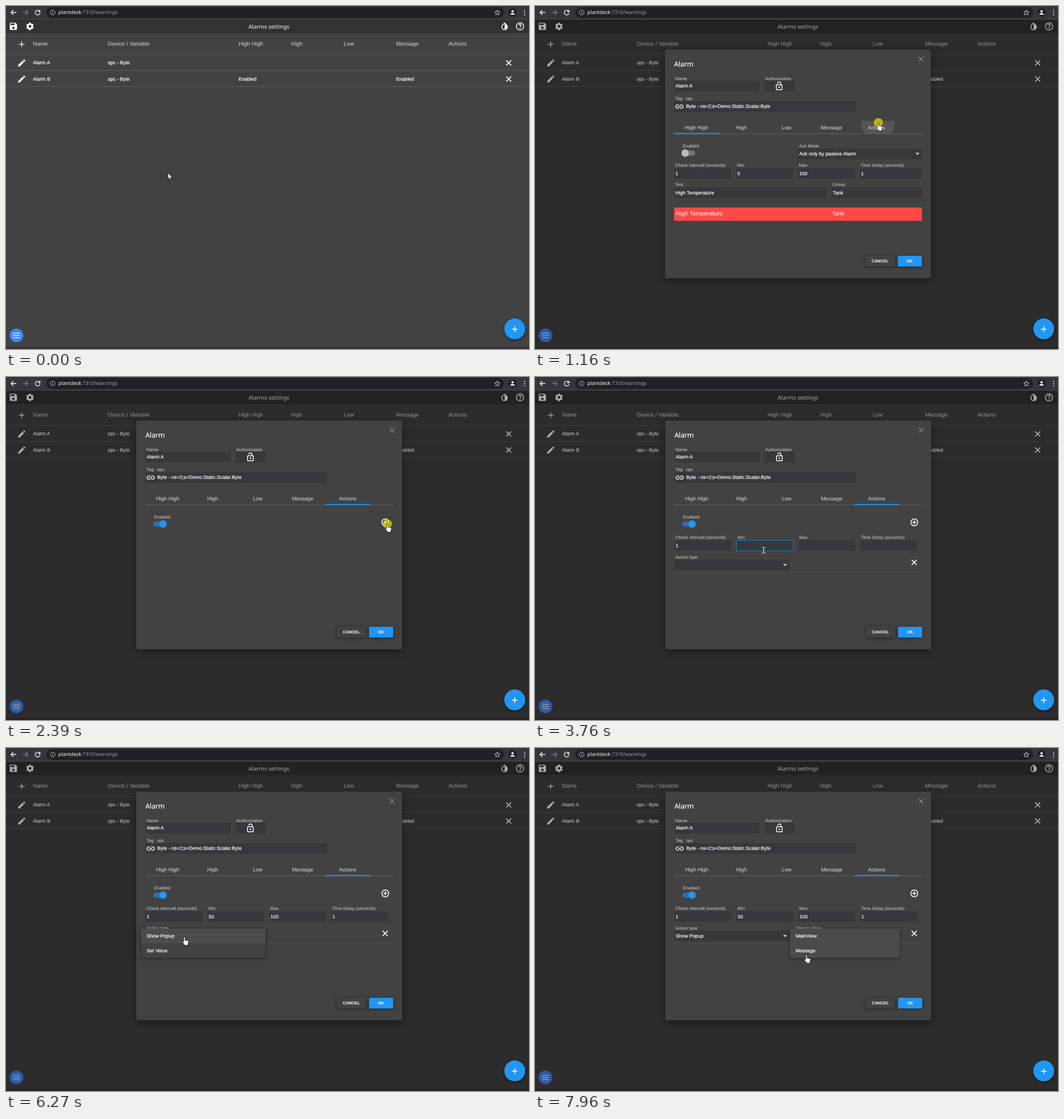
These frames come from a looping animation (923 by 606 pixels, 8 s). An HTML page:

```html
<!DOCTYPE html>
<html lang="en">
<head>
<meta charset="utf-8">
<title>Alarms settings</title>
<style>
html, body { margin: 0; width: 100%; height: 100%; overflow: hidden; background: #424242; }
svg { display: block; }
text {
  font-family: "Liberation Sans", Arial, sans-serif; font-size: 8.65px; fill: #fff;
  dominant-baseline: central; text-rendering: geometricPrecision; white-space: pre;
}
.ui { font-family: "Noto Sans", "Open Sans", sans-serif; }
.head text { font-size: 9.9px; fill: #d6d6d6; }
.val { stroke: #fff; stroke-width: .2px; }
.lab { font-size: 7.93px; fill: #cfcfcf; }
.tab text { font-size: 9.3px; fill: #dcdcdc; text-anchor: middle; }
.btn { font-size: 7.25px; font-weight: bold; text-anchor: middle; }
.box { fill: #37373c; }
.focus { stroke: #1b80c4; }
.icon { fill: #fff; fill-rule: evenodd; }
.line { fill: none; stroke: #fff; }
.dialog { filter: drop-shadow(0 5px 8px rgba(0, 0, 0, .4)); }
.menu { filter: drop-shadow(0 1.5px 2.5px rgba(0, 0, 0, .5)); }
</style>
</head>
<body>
<svg width="923" height="606" viewBox="0 0 923 606">
  <defs>
    <path id="pencil" class="icon" d="M3 17.25V21h3.75L17.81 9.94l-3.75-3.75zM20.71 7.04a1 1 0 0 0 0-1.41l-2.34-2.34a1 1 0 0 0-1.41 0l-1.83 1.83 3.75 3.75z" transform="scale(.7) translate(-12 -12)"/>
    <path id="cross" class="line" stroke-width="1.7" d="M-4.4-4.4 4.4 4.4M4.4-4.4-4.4 4.4"/>
    <path id="plus" class="line" d="M-5 0H5M0-5V5"/>
    <path id="drop" fill="#d8d8d8" d="M-3.6-1.8H3.6L0 1.8z"/>
    <clipPath id="paneClip"><rect x="244" y="228" width="440" height="206"/></clipPath>
    <clipPath id="tabClip"><rect x="563" y="203" width="80" height="23"/></clipPath>
  </defs>

  <g id="page">
    <rect width="923" height="606" fill="#424242"/>
    <rect y="602" width="923" height="4" fill="#3b3437"/>
    <rect y="24" width="923" height="24" fill="#323232"/>
    <path class="icon" transform="translate(4.5 27.3) scale(.71)" d="M17 3H5a2 2 0 0 0-2 2v14a2 2 0 0 0 2 2h14a2 2 0 0 0 2-2V7zM12 19a3 3 0 1 1 0-6 3 3 0 0 1 0 6zM15 9H5V5h10z"/>
    <g class="line" transform="translate(42.3 36)">
      <circle r="4" stroke-width="3.2"/>
      <circle r="5.8" stroke-width="1.9" pathLength="12" stroke-dasharray="1" stroke-dashoffset="-.5"/>
    </g>
    <path class="icon" transform="translate(871.4 27.3) scale(.71)" d="M17.66 7.93 12 2.27 6.34 7.93a8 8 0 1 0 11.32 0zM12 19.59a6 6 0 0 1-4.24-10.24L12 5.1z"/>
    <path class="icon" transform="translate(898.5 27.3) scale(.72)" d="M11 18h2v-2h-2zM12 2a10 10 0 1 0 0 20 10 10 0 0 0 0-20zm0 18a8 8 0 1 1 0-16 8 8 0 0 1 0 16zm0-14a4 4 0 0 0-4 4h2a2 2 0 1 1 4 0c0 2-3 1.75-3 5h2c0-2.25 3-2.5 3-5a4 4 0 0 0-4-4z"/>
    <text class="ui" x="464" y="36" font-size="9.9" style="font-size:9.9px" text-anchor="middle">Alarms settings</text>
    <use href="#plus" x="27.7" y="67.6" stroke-width="1.2"/>
    <g class="head">
      <text x="47.5" y="67.5">Name</text>
      <text x="179.5" y="67.5">Device / Variable</text>
      <text x="410.5" y="67.5">High High</text>
      <text x="503" y="67.5">High</text>
      <text x="596" y="67.5">Low</text>
      <text x="688.5" y="67.5">Message</text>
      <text x="781" y="67.5">Actions</text>
    </g>
    <path stroke="#5c5c5c" d="M0 85.5H923M0 113.9H923M0 142.4H923"/>
    <g class="val">
      <text x="47.5" y="100.3">Alarm A</text><text x="179.5" y="100.3">opc - Byte</text>
      <text x="47.5" y="128.6">Alarm B</text><text x="179.5" y="128.6">opc - Byte</text>
      <text x="410.5" y="128.6">Enabled</text><text x="688.5" y="128.6">Enabled</text>
    </g>
    <use href="#pencil" x="27.8" y="100.6"/><use href="#pencil" x="27.8" y="129"/>
    <use href="#cross" x="887.2" y="100.5"/><use href="#cross" x="887.2" y="128.9"/>
    <circle cx="18.5" cy="582" r="12" fill="#4486f8"/>
    <path class="line" stroke-width="1.3" d="M12.5 578.3h12M12.5 582.1h12M12.5 585.9h12"/>
  </g>

  <rect id="shade" y="24" width="923" height="582"/>

  <g id="browser">
    <rect width="923" height="24" fill="#35363a"/>
    <rect y="23" width="923" height="1" fill="#48494d"/>
    <rect x="71" y="2" width="808" height="19" rx="9.5" fill="#202124"/>
    <g class="line" stroke-width="1.3">
      <path d="M18 11.5H9M13 7.3 8.8 11.5 13 15.7"/>
      <path stroke="#7d7e81" d="M29.5 11.5H38.5M34.5 7.3 38.7 11.5 34.5 15.7"/>
      <path d="M59.3 9A4.2 4.2 0 1 0 60 12.6"/>
      <path fill="#fff" stroke="none" d="M60.6 6.5V10.9H56.2z"/>
      <circle cx="82.3" cy="11.5" r="4.2" stroke="#c4c6c9" stroke-width="1"/>
      <path stroke="#c4c6c9" stroke-width="1" d="M82.3 11V13.8M82.3 9V10"/>
      <path stroke="#d0d2d5" stroke-width="1" d="M867.2 6.9 868.5 10.1 871.9 10.4 869.3 12.6 870.1 15.9 867.2 14.1 864.3 15.9 865.1 12.6 862.5 10.4 865.9 10.1z"/>
    </g>
    <text class="ui" x="92.5" y="11.3" style="font-size:8.8px">plantdesk<tspan fill="#9aa0a6">:7310/warnings</tspan></text>
    <circle cx="894" cy="11.5" r="7.5" fill="#202124"/>
    <path fill="#fff" d="M890 15.2q0-2.6 4-2.6t4 2.6zM894 7.3a2.1 2.1 0 1 0 .01 0z"/>
    <path stroke="#fff" stroke-width="1.9" stroke-linecap="round" d="M915.3 7.7v.01M915.3 11.7v.01M915.3 15.7v.01"/>
  </g>

  <g style="filter:drop-shadow(0 2px 2.5px rgba(0,0,0,.4))">
    <circle cx="897.8" cy="570.4" r="18.4" fill="#2196f3"/>
  </g>
  <use href="#plus" x="897.8" y="571" stroke-width="1.5"/>

  <g id="dialog">
    <g class="dialog"><rect x="229.5" y="77" width="469" height="404" rx="3" fill="#424242"/></g>
    <text class="ui" x="245.5" y="102.8" style="font-size:12.2px" stroke="#fff" stroke-width=".2">Alarm</text>
    <path class="line" stroke="#c4c4c4" style="stroke:#b8b8b8" d="M676.7 89.7l8.6 8.6M685.3 89.7l-8.6 8.6"/>
    <text class="lab" x="247.3" y="128">Name</text>
    <rect class="box" x="245.5" y="132" width="150.5" height="19"/>
    <text class="val" x="247.8" y="141.2">Alarm A</text>
    <text class="lab" x="406" y="128">Authorization</text>
    <rect class="box" x="404.5" y="132" width="52.7" height="19"/>
    <path class="icon" transform="translate(422.2 132.8) scale(.72)" d="M12 17a2 2 0 1 0 0-4 2 2 0 0 0 0 4zm6-9h-1V6A5 5 0 0 0 7 6h1.9a3.1 3.1 0 0 1 6.2 0v2H6a2 2 0 0 0-2 2v10a2 2 0 0 0 2 2h12a2 2 0 0 0 2-2V10a2 2 0 0 0-2-2zm0 12H6V10h12z"/>
    <text class="lab" x="247.3" y="163.6">Tag</text><text class="lab" x="266" y="163.6">opc</text>
    <rect class="box" x="245.5" y="168" width="320.7" height="18.8"/>
    <path class="icon" transform="translate(246.3 169.3) scale(.71)" d="M3.9 12A3.1 3.1 0 0 1 7 8.9h4V7H7a5 5 0 0 0 0 10h4v-1.9H7A3.1 3.1 0 0 1 3.9 12zM8 13h8v-2H8zm9-6h-4v1.9h4a3.1 3.1 0 0 1 0 6.2h-4V17h4a5 5 0 0 0 0-10z"/>
    <text class="val" x="266.6" y="177.2">Byte - ns=2;s=Demo.Static.Scalar.Byte</text>

    <g clip-path="url(#tabClip)"><circle id="ripple" cx="605.5" cy="206" fill="#fff"/></g>
    <g class="tab">
      <text x="285" y="214.7">High High</text><text x="364" y="214.7">High</text>
      <text x="443.8" y="214.7">Low</text><text x="523" y="214.7">Message</text>
      <text x="602.5" y="214.7">Actions</text>
    </g>
    <rect x="245.5" y="225.4" width="437.5" height="1" fill="#606060"/>
    <rect id="ink" x="245.5" y="224.4" width="79.5" height="1.8" fill="#2196f3"/>

    <g clip-path="url(#paneClip)">
      <g id="levelPane">
        <text class="lab" x="260.7" y="247.6">Enabled</text>
        <rect x="259.3" y="255.4" width="23.6" height="9" rx="4.5" fill="#757575"/>
        <circle cx="265" cy="259.9" r="6.6" fill="#bdbdbd"/>
        <text class="lab" x="466" y="247.6">Ack Mode</text>
        <rect class="box" x="464.3" y="251.8" width="218" height="19"/>
        <text class="val" x="466.3" y="261.2">Ack only by passive Alarm</text>
        <use href="#drop" x="675" y="261.2"/>
        <g id="levelFields"></g>
        <rect x="245.5" y="356" width="437.5" height="23.5" fill="#ff4848"/>
        <text x="248.8" y="367.8" style="font-size:10.4px">High Temperature</text>
        <text x="523.8" y="367.8" style="font-size:10.4px">Tank</text>
      </g>
      <g id="actionPane">
        <text class="lab" x="260.7" y="247.6">Enabled</text>
        <rect id="track" x="259.3" y="255.4" width="23.6" height="9" rx="4.5"/>
        <circle id="thumb" cy="259.9" r="6.6"/>
        <circle class="line" cx="668.9" cy="256.8" r="6.1" stroke-width="1.5"/>
        <path class="line" stroke-width="1.5" d="M665.4 256.8h7M668.9 253.3v7"/>
        <g data-on="2460">
          <g id="rangeFields"></g>
          <text class="lab" x="247.3" y="318.2">Action type</text>
          <rect class="box" x="245.5" y="322.6" width="203.5" height="18.8"/>
          <use href="#drop" x="440.7" y="332.2"/>
          <text class="val" x="247.8" y="332" data-on="7150">Show Popup</text>
          <g data-on="7150">
            <text class="lab" x="459.3" y="318.2">View to show</text>
            <rect class="box" x="457.7" y="322.6" width="177" height="18.8"/>
            <use href="#drop" x="627" y="332.2"/>
          </g>
          <use href="#cross" x="668.7" y="327.6"/>
          <path stroke="#4c4c4c" d="M245.5 345H680"/>
        </g>
      </g>
    </g>

    <g class="menu">
      <rect x="583" y="441.2" width="52" height="19" rx="2" fill="#424242"/>
      <rect x="640.3" y="441.2" width="42.5" height="19" rx="2" fill="#2196f3"/>
    </g>
    <text class="btn" x="609" y="450.9">CANCEL</text>
    <text class="btn" x="661.4" y="450.9">OK</text>
  </g>

  <g data-on="6186 7150">
    <g class="menu"><rect x="238.2" y="319" width="219.8" height="52" rx="2" fill="#424242"/></g>
    <rect x="238.2" y="319" width="219.8" height="26" fill="#4c4c4c"/>
    <text class="val" x="248.3" y="332">Show Popup</text>
    <text class="val" x="248.3" y="357.8">Set Value</text>
  </g>
  <g data-on="7640">
    <g class="menu"><rect x="450" y="319" width="193.5" height="52" rx="2" fill="#424242"/></g>
    <rect x="450" y="319" width="193.5" height="26" fill="#4a4a4a"/>
    <rect x="450" y="345" width="193.5" height="26" fill="#4a4a4a" data-on="7880"/>
    <text class="val" x="460" y="332">MainView</text>
    <text class="val" x="460" y="357.8">Message</text>
  </g>

  <g id="cursor">
    <circle id="press" r="8" fill="#e0d800" opacity=".72"/>
    <g stroke="#000" stroke-width=".7" fill="#fff" stroke-linejoin="round">
      <path id="arrow" d="M0 0V10.8L2.5 8.5 4.2 12.2 5.8 11.5 4.2 7.9H7.4z"/>
      <path id="hand" d="M-1.2 1.2a1.2 1.2 0 0 1 2.4 0V5.6l4.7 1q1.7.4 1.5 2L6.2 12V14.6H-.2V13L-4 8.8q-.2-1.5 1.2-1.3l1.6 1.3z"/>
    </g>
    <path id="beam" class="line" d="M-3-5q2.4 0 3 .8.6-.8 3-.8M0-4.2V4.2M-3 5q2.4 0 3-.8.6.8 3 .8"/>
  </g>
</svg>
<script>
const LOOP = 8000, STEP = 81, FIRST = 30, DIGIT = 4.81;
const $ = id => document.getElementById(id);
const within = (q, [from, to = LOOP]) => q >= from && q < to;
const ramp = (q, from, to) => Math.min(1, Math.max(0, (q - from) / (to - from)));
const smooth = p => p * p * (3 - 2 * p);
const show = (el, on) => el.setAttribute('visibility', on ? 'inherit' : 'hidden');

function add(parent, tag, attrs, content = '') {
  const el = document.createElementNS('http://www.w3.org/2000/svg', tag);
  for (const key in attrs) el.setAttribute(key, attrs[key]);
  el.textContent = content;
  parent.append(el);
  return el;
}

function addField(parent, label, x, y, width, value = '') {
  add(parent, 'text', { class: 'lab', x: x + 1.8, y: y - 4.8 }, label);
  const box = add(parent, 'rect', { class: 'box', x, y, width, height: 18.6 });
  const text = add(parent, 'text', { class: 'val', x: x + 2.3, y: y + 9.2 }, value);
  return { box, text };
}

[['Check intervall (seconds)', 245.5, 286.3, 100.5, '1'], ['Min', 354.8, 286.3, 100.5, '0'],
 ['Max', 464, 286.3, 100.5, '100'], ['Time Delay (seconds)', 573, 286.3, 109.3, '1'],
 ['Text', 245.5, 320.6, 269.5, 'High Temperature'], ['Group', 523.3, 320.6, 159, 'Tank']]
  .forEach(f => addField($('levelFields'), ...f));

// keys: time at which each character is typed
const inputs = [
  { label: 'Check intervall (seconds)', x: 245.5, focus: [3110, 3675], text: '1', keys: [3270], caret: [[3110, 3430]] },
  { label: 'Min', x: 355, focus: [3675, 4400], text: '50', keys: [3999, 4161], caret: [[3918, 4400]] },
  { label: 'Max', x: 464, focus: [4400, 5290], text: '100', keys: [4809, 4971, 5050], caret: [[4566, 5290]] },
  { label: 'Time Delay (seconds)', x: 573.2, focus: [5290, 6186], text: '1', keys: [5780], caret: [[5457, 5619], [5780, 6186]] }
];
for (const f of inputs) {
  Object.assign(f, addField($('rangeFields'), f.label, f.x, 288.4, 100.5));
  f.bar = add($('rangeFields'), 'rect', { y: 292.5, width: .9, height: 10.5, fill: '#fff' });
}

// time, x, y, shape
const path = [
  [0, 286, 295, 'arrow'], [30, 286, 295, 'arrow'], [440, 27, 101, 'hand'], [540, 27, 101, 'arrow'],
  [760, 330, 173, 'arrow'], [1000, 606, 206, 'hand'], [1410, 606, 206, 'arrow'],
  [1860, 272, 258, 'hand'], [2040, 272, 258, 'arrow'], [2300, 673, 259.5, 'hand'], [2540, 673, 259.5, 'arrow'],
  [3100, 262, 299, 'beam'], [3420, 262, 299, 'beam'], [3670, 403.5, 306, 'beam'], [5290, 403.5, 306, 'beam'],
  [5450, 410.5, 307, 'beam'], [5700, 410.5, 307, 'arrow'], [6020, 315, 334, 'hand'], [6520, 315, 334, 'hand'],
  [6900, 295, 338.5, 'hand'], [7150, 295, 338.5, 'arrow'], [7330, 340, 338, 'arrow'],
  [7550, 504, 329, 'hand'], [7730, 504, 329, 'hand'], [7960, 479, 365.5, 'hand'], [LOOP, 479, 365.5, 'hand']
];
const presses = [[430, 560], [1150, 1330], [1860, 2000], [2330, 2450], [3100, 3200],
                 [3590, 3700], [6100, 6200], [7070, 7150], [7560, 7640]];
const timed = [...document.querySelectorAll('[data-on]')]
  .map(el => [el, el.dataset.on.split(' ').map(Number)]);

function moveCursor(q) {
  let i = path.length - 2;
  while (i > 0 && path[i][0] > q) i--;
  const [t0, x0, y0, shape] = path[i], [t1, x1, y1] = path[i + 1];
  const p = smooth(ramp(q, t0, t1));
  $('cursor').setAttribute('transform', `translate(${x0 + (x1 - x0) * p} ${y0 + (y1 - y0) * p})`);
  for (const id of ['arrow', 'hand', 'beam']) show($(id), id === shape);
  show($('press'), presses.some(w => within(q, w)));
}

function draw(t) {
  const q = t < FIRST ? 0 : FIRST + STEP * Math.floor((t - 10) / STEP);

  const open = ramp(q, 480, 660), grow = .7 + .3 * smooth(open);
  $('shade').setAttribute('opacity', .33 * open);
  $('dialog').setAttribute('opacity', open);
  $('dialog').setAttribute('transform',
    `translate(${464 + (q > 1200 ? .5 : 0)} 279) scale(${grow}) translate(-464 -279)`);

  const slide = smooth(ramp(q, 1180, 1660));
  $('ink').setAttribute('x', 245.5 + 317.7 * slide);
  $('levelPane').setAttribute('transform', `translate(${-440 * slide} 0)`);
  $('actionPane').setAttribute('transform', `translate(${440 * (1 - slide)} 0)`);
  show($('levelPane'), slide < 1);
  show($('actionPane'), slide > 0);

  const wave = ramp(q, 1080, 1400);
  $('ripple').setAttribute('r', 115 * wave);
  $('ripple').setAttribute('opacity', .1 * (1 - ramp(q, 1330, 1650)));

  const on = smooth(ramp(q, 1880, 2000));
  $('thumb').setAttribute('cx', 265 + 11.6 * on);
  $('thumb').setAttribute('fill', on ? '#2196f3' : '#bdbdbd');
  $('track').setAttribute('fill', on ? '#306fa3' : '#757575');

  for (const [el, span] of timed) show(el, within(q, span));
  for (const f of inputs) {
    const typed = f.keys.filter(k => q >= k).length;
    f.text.textContent = f.text === '' ? '' : f.chars.slice(0, typed);
    f.box.classList.toggle('focus', within(q, f.focus));
    f.bar.setAttribute('x', f.x + 2.6 + DIGIT * typed);
    show(f.bar, f.caret.some(w => within(q, w)));
  }
  moveCursor(q);
}

['1', '50', '100', '1'].forEach((chars, i) => inputs[i].chars = chars);
const start = performance.now();
(function tick() {
  draw((performance.now() - start) % LOOP);
  requestAnimationFrame(tick);
})();
</script>
</body>
</html>
```
